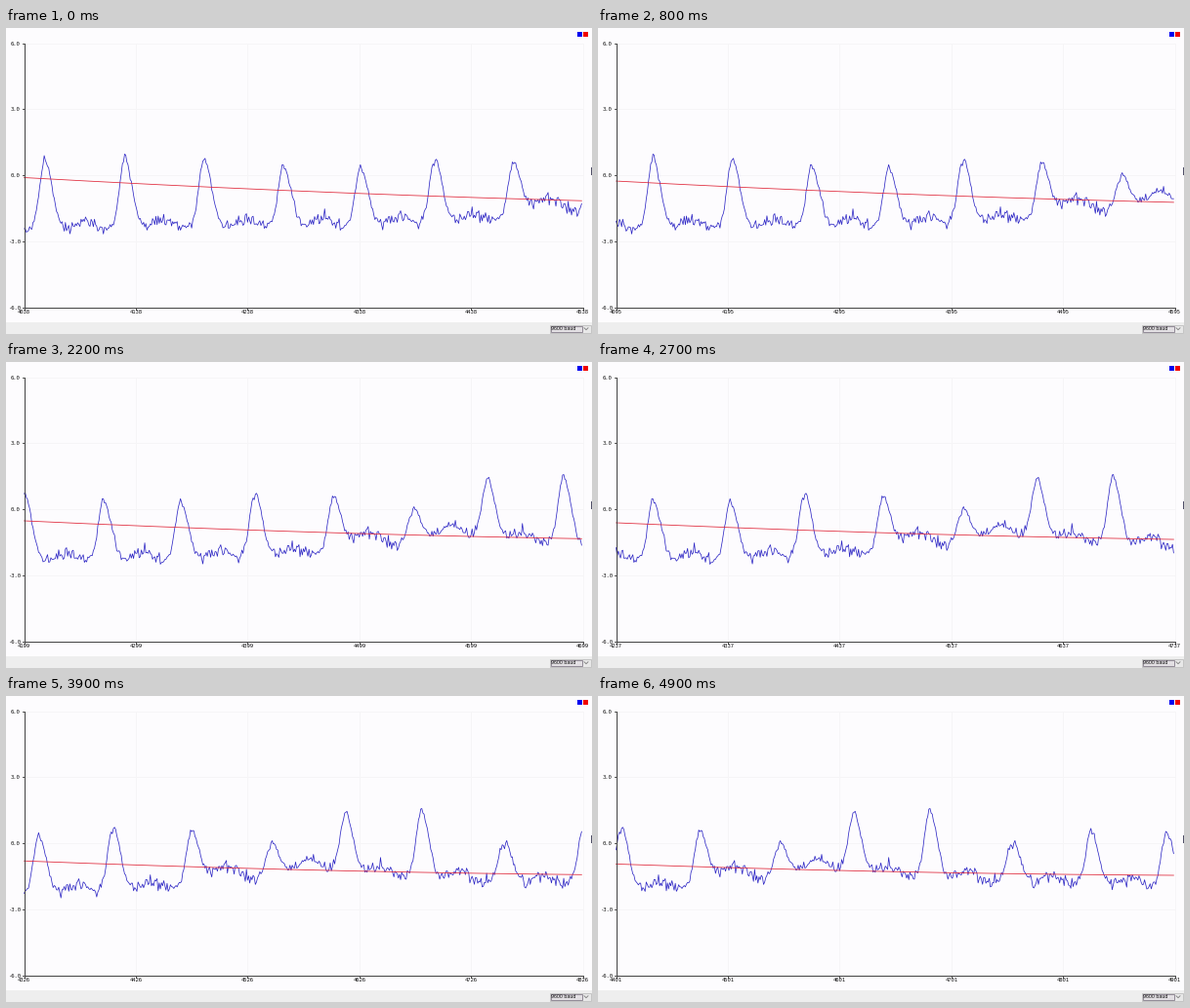
Recreate the animation shown at these times as a matplotlib script. Size 600 by 314 pixels, loop 5000 ms.

```python
import numpy as np
import matplotlib.pyplot as plt
from matplotlib.animation import FuncAnimation
from matplotlib.patches import Rectangle

W, H, DPI = 600, 314, 100
PX = 72 / DPI
FRAMES, INTERVAL = 50, 100
LEFT, RIGHT, TOP, BOTTOM = 18, 590, 15, 286
SPAN = 500
STEP = (RIGHT - LEFT) / SPAN
FIRST, LAST = 4030, 4910

# Key points: (sample, height in px) and (frame, first visible sample)
PEAKS = [(4056.5, 137), (4128, 135), (4199, 135), (4270, 142), (4339, 144),
         (4405.5, 135), (4476, 138), (4547.5, 151), (4613.5, 120),
         (4681.5, 118), (4755.5, 150), (4826, 140), (4893.5, 140)]
BASELINE = [(4030, 208), (4330, 203), (4465, 198), (4500, 181), (4530, 190),
            (4580, 176), (4670, 186), (4900, 198)]
SCROLL = [(0, 4038), (8, 4095), (33, 4282), (49, 4401)]


def interpolate(x, points):
    return np.interp(x, *zip(*points))


def heartbeat(samples):
    """Fast rise, slower fall and a low second bump around every peak."""
    curve = interpolate(samples, BASELINE)
    for time, _ in PEAKS:
        curve -= 9 * np.exp(-((samples - time - 35) / 11) ** 2)
    for time, height in PEAKS:
        dt = samples - time
        pulse = np.exp(-(dt / np.where(dt < 0, 6.5, 9.5)) ** 2)
        curve += pulse * (height - curve)
    return curve


samples = np.arange(FIRST, LAST)
noise = np.random.default_rng(7).normal(0, 3.7, samples.size)
clean = heartbeat(samples)
signal = clean + noise / (1 + 0.25 * np.abs(np.gradient(clean)))
progress = (samples - 4038) / 863
average = 153.5 + 55.5 * progress - 25 * progress ** 2

fig = plt.figure(figsize=(W / DPI, H / DPI), dpi=DPI, facecolor="#fdfcfe")
ax = fig.add_axes([0, 0, 1, 1])
ax.set(xlim=(0, W), ylim=(H, 0))
ax.axis("off")


def stroke(xs, ys, color, width=1.0, **kw):
    line, = ax.plot(np.add(xs, 0.5), np.add(ys, 0.5), color=color, lw=width * PX, **kw)
    return line


def box(x, y, w, h, fill, edge="none"):
    ax.add_patch(Rectangle((x, y), w, h, fc=fill, ec=edge, lw=PX, zorder=3))


def label(x, y, text, ha, font="DejaVu Sans Mono", size=5.5):
    return ax.text(x, y, text, ha=ha, va="center_baseline", family=font,
                   fontsize=size * PX, color="#111111", zorder=5)


grid_x = np.linspace(LEFT, RIGHT, 6)
grid_y = np.linspace(TOP, BOTTOM, 5)

for x in grid_x:
    stroke([x, x], [TOP, BOTTOM], "#f6f5f7")
    stroke([x, x], [BOTTOM, BOTTOM + 2], "#555555", zorder=4)
for i, y in enumerate(grid_y):
    stroke([LEFT, RIGHT], [y, y], "#f6f5f7")
    stroke([LEFT - 2, LEFT], [y, y], "#555555", zorder=4)
    label(14.8, y + 0.6, f"{6 - 3 * i:.1f}", "right")

signal_line = stroke([], [], "#2c25c4", 0.75, zorder=2.2)
average_line = stroke([], [], "#e02a3c", 0.8, zorder=2.4)
stroke([LEFT, LEFT], [TOP, BOTTOM], "#444444", zorder=4)
stroke([LEFT, RIGHT], [BOTTOM, BOTTOM], "#444444", zorder=4)
x_labels = [label(x + 0.5, 291.3, "", "center") for x in grid_x]

box(585, 4, 5, 5, "#0000f0")
box(591, 4, 5, 5, "#f00000")
box(599, 143, 1, 8, "#505068")

box(0, 302, W, 12, "#eeeeee")
box(556.5, 304.5, 42, 8, "#e8e8e8", "#c4c4c4")
box(557.5, 305.5, 32, 6, "#e2dfe3", "#938c98")
label(558.5, 308.5, "9600 baud", "left", "Liberation Sans", 5.2)
stroke([591.5, 593.5, 595.5], [307.2, 309.2, 307.2], "#777777", 0.8, zorder=5)


def update(frame):
    start = int(interpolate(frame, SCROLL))
    view = slice(start - FIRST, start - FIRST + SPAN)
    xs = LEFT + 0.5 + np.arange(SPAN) * STEP
    signal_line.set_data(xs, signal[view])
    average_line.set_data(xs, average[view])
    for i, text in enumerate(x_labels):
        text.set_text(str(start + 100 * i))
    return [signal_line, average_line, *x_labels]


anim = FuncAnimation(fig, update, frames=FRAMES, interval=INTERVAL,
                     repeat=True, repeat_delay=0)
plt.show()
```
